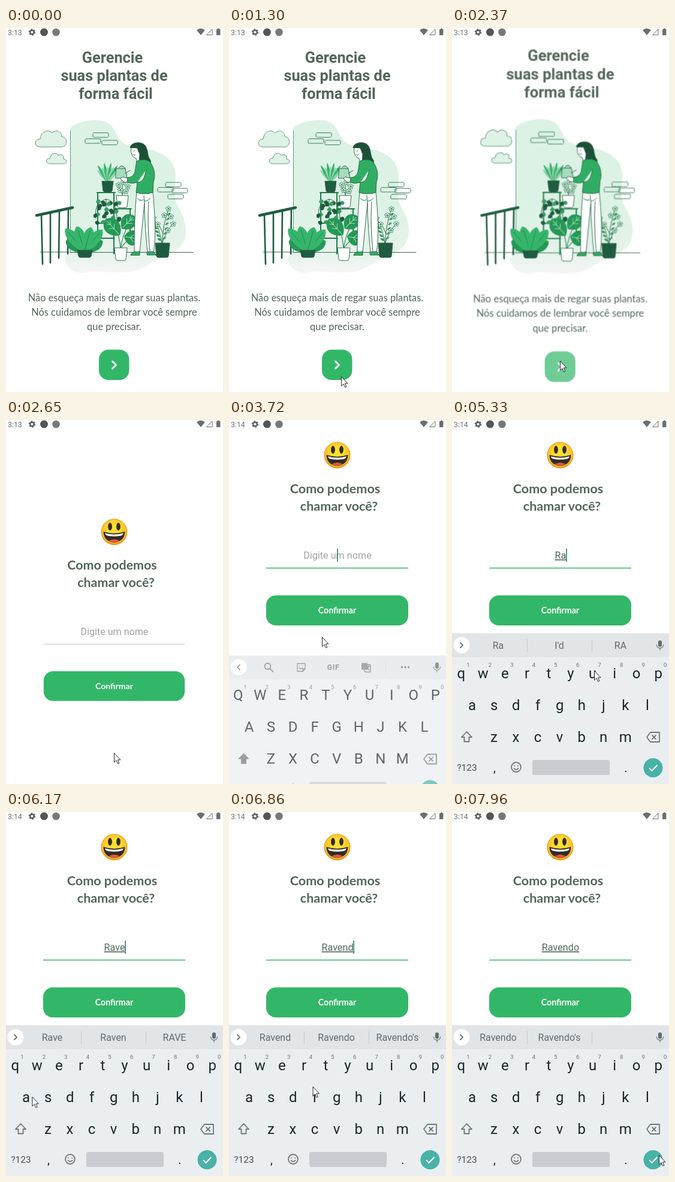
Animation of 362 by 606 pixels, one loop 8000 ms. Source, as an HTML page:

```html
<!DOCTYPE html>
<html lang="pt">
<head>
<meta charset="utf-8">
<title>Plantas</title>
<style>
html, body { margin: 0; width: 100%; height: 100%; overflow: hidden; background: #fff; }
svg { display: block; width: 362px; height: 606px; overflow: hidden; font-family: Roboto, sans-serif; }
text { white-space: pre; }
.ink { fill: #52665a; }
.mid { text-anchor: middle; }
.soft { font-family: Lato, sans-serif; }
.b { font-weight: 700; }
.key { font-size: 24px; fill: #17262b; text-anchor: middle; }
.hint { font-size: 9.5px; fill: #6b757a; text-anchor: middle; }
.word { font-size: 16px; fill: #5f6b70; text-anchor: middle; }
.typed { font-size: 16.2px; fill: #52665a; text-anchor: middle; text-decoration: underline; }
.line { fill: none; stroke: #1f5c3f; stroke-linecap: round; stroke-linejoin: round; }
.ico { fill: none; stroke: #6d777c; stroke-width: 1.8; stroke-linecap: round; stroke-linejoin: round; }
.thin { stroke-width: 1.3; }
.dots { stroke-width: 3.6; }

#welcome, #ask { transform-origin: 181px 305px; }
#welcome { animation: leave 8s linear infinite; }
#ask { animation: enter 8s linear infinite; }
#go { animation: press 8s step-end infinite; }
#form { animation: lift 8s step-end infinite; }
#field { stroke: #cfcfcf; animation: focus 8s step-end infinite; }
#board { animation: slide 8s linear infinite; }
#mouse { animation: move 8s linear infinite; }

@keyframes leave {
  0%, 29.25% { transform: scale(1); opacity: 1; }
  29.6% { transform: scale(1.012); }
  30.1% { transform: scale(1.014); opacity: 1; }
  30.5% { transform: scale(1.07); opacity: .6; }
  31.2%, 100% { transform: scale(1.12); opacity: 0; }
}
@keyframes enter {
  0%, 30.1% { transform: scale(.87); opacity: 0; }
  30.5% { transform: scale(.94); opacity: .5; }
  31.2% { transform: scale(.975); opacity: 1; }
  31.8% { transform: scale(.988); }
  33.125% { transform: scale(.993); }
  34.5%, 100% { transform: scale(1); opacity: 1; }
}
@keyframes press { 0% { opacity: 1; } 25.5%, 100% { opacity: .7; } }
@keyframes lift { 0% { transform: translateY(127px); } 45%, 100% { transform: none; } }
@keyframes focus { 0% { stroke: #cfcfcf; } 40.75%, 100% { stroke: #32b768; } }
@keyframes slide {
  0%, 45% { transform: translateY(252px); opacity: .3; animation-timing-function: cubic-bezier(.1, .5, .5, 1); }
  46.5% { transform: translateY(37px); opacity: .7; animation-timing-function: ease-out; }
  48.125%, 100% { transform: translateY(0); opacity: 1; }
}
@keyframes move {
  0%, 7% { transform: translate(173px, 607px); }
  16.25%, 17.5% { transform: translate(187px, 580px); }
  21%, 33.75% { transform: translate(180px, 554px); }
  39.9%, 51% { transform: translate(155px, 361px); }
  55.25%, 57% { transform: translate(88px, 424px); }
  62%, 63.25% { transform: translate(106px, 478px); }
  66.625% { transform: translate(237px, 417px); }
  68.5% { transform: translate(238px, 418px); }
  71.75% { transform: translate(185px, 438px); }
  75.25%, 77.125% { transform: translate(43px, 474px); }
  80.25%, 81% { transform: translate(124px, 424px); }
  83.6%, 84.5% { transform: translate(107px, 474px); }
  85.75% { transform: translate(139px, 457px); }
  89.75%, 91.9% { transform: translate(308px, 424px); }
  97.25% { transform: translate(339px, 560px); }
  99.5%, 100% { transform: translate(345px, 571px); }
}
</style>
</head>
<body>
<svg viewBox="0 0 362 606">
<defs>
  <linearGradient id="wash" x1="0" y1="0" x2="0" y2="1">
    <stop offset=".55" stop-color="#dcf2e5"/><stop offset=".86" stop-color="#e6f3eb"/><stop offset="1" stop-color="#f5f6f6"/>
  </linearGradient>
  <radialGradient id="sun" cx=".5" cy=".4" r=".6">
    <stop offset=".3" stop-color="#fde030"/><stop offset=".75" stop-color="#fbc327"/><stop offset="1" stop-color="#f0932a"/>
  </radialGradient>
</defs>

<g id="welcome">
  <g class="ink b mid" font-size="25.3">
    <text x="177.5" y="58">Gerencie</text>
    <text x="180.5" y="88">suas plantas de</text>
    <text x="183" y="118">forma fácil</text>
  </g>
  <path fill="url(#wash)" d="M107 166C120 156 140 152 158 154C176 157 180 168 186 180C194 196 212 198 232 201C262 205 283 222 283 246C283 262 279 272 283 288C289 304 300 316 300 338C300 362 284 373 262 381C238 390 228 406 196 407C172 409 150 402 128 408C108 408 97 392 98 382L107 372Z"/>
  <g class="line" id="scene">
    <path stroke="#4f9f75" d="M107.5 171V374"/>
    <path stroke-width=".9" d="M57 373H106M108 373.5H312"/>
    <g fill="#def2e6" stroke="#5c9a7b">
      <path d="M57 198C46 198 47 184 57 185C58 173 70 167 77 175C84 168 93 172 93 181C102 181 104 196 94 198Z"/>
      <path d="M73 226C65 226 66 216 73 217C75 208 84 206 87 212C93 209 97 212 96 218C103 219 102 226 96 226Z"/>
    </g>
    <path stroke-width="4.5" d="M51 312L111 299"/>
    <path stroke-width="2.6" d="M59 312L61 393M74 309L74 391M89 306L88 383M104 303L103 376"/>
    <path stroke-width="2" d="M153 274V351M180 274V376M207 301V350M152 274H182M181 301H209M153 325H181M154 350H181" stroke="#237a4b"/>
  </g>
  <g id="plants"></g>
  <g class="line" stroke-width=".9">
    <path fill="#a6dcbc" d="M184 234H199L202 250H183ZM199 242L207 237M184 237L180 234M188 233Q193 225 199 234"/>
    <path fill="#fff" d="M214 372C214 338 215 302 218 273H245C248 306 251 345 246 374H236C234 350 231 320 231 291L223 374ZM231 291L230 279M241 283Q236 289 231 288M238 289Q235 325 240 372M219 284Q224 289 229 286"/>
    <path fill="#2fae63" d="M208 378Q211 371 217 373L223 372V378ZM235 373L245 372 251 378H236Z"/>
    <path fill="#fff" d="M209 200C207 207 211 216 217 217L218 222 228 221 227 205 219 197ZM203 250L194 248 191 251 196 256 203 257Z"/>
    <path fill="#1d4f38" d="M207 199C209 189 228 188 233 197C238 206 235 213 241 220C243 227 237 231 231 230L222 226 223 210 219 200Z"/>
    <path fill="#2fae63" d="M218 222C226 217 237 219 241 224C247 232 250 246 246 256L245 274Q231 278 217 274L219 257Q210 260 202 257L203 249Q212 249 215 240ZM219 257Q228 257 231 247L234 236"/>
    <path stroke-width=".8" d="M213 205l2-.5M212 211q2 2 4 0"/>
  </g>
  <g class="ink soft mid" font-size="16.4">
    <text x="180.5" y="455">Não esqueça mais de regar suas plantas.</text>
    <text x="180.5" y="479">Nós cuidamos de lembrar você sempre</text>
    <text x="180.5" y="503">que precisar.</text>
  </g>
  <g id="go">
    <rect x="155" y="535.5" width="50.5" height="50.5" rx="16" fill="#32b768"/>
    <path d="M177.5 555l6 6-6 6" fill="none" stroke="#fff" stroke-width="3" stroke-linecap="round" stroke-linejoin="round"/>
  </g>
</g>

<g id="ask"><g id="form">
  <circle cx="180.5" cy="58.5" r="21.5" fill="url(#sun)" stroke="#eb8f00"/>
  <ellipse cx="173.5" cy="49.5" rx="3.4" ry="6.4" fill="#322b26"/>
  <ellipse cx="187.5" cy="49.5" rx="3.4" ry="6.4" fill="#322b26"/>
  <path d="M162.500 58Q180.500 64 198.500 58C198.500 69 191 76 180.500 76S162.500 69 162.500 58Z" fill="#322b26"/>
  <path d="M165 60.500Q180.500 65 196 60.500C195.500 63 194 64.500 191 65Q180.500 67 170 65C167 64.500 165.500 63 165 60.500Z" fill="#fff"/>
  <path d="M171.500 73.500Q180.500 68.500 189.500 73.500Q180.500 77.500 171.500 73.500Z" fill="#ea5a3d"/>
  <g class="ink soft b mid" font-size="21.6">
    <text x="177" y="122">Como podemos</text>
    <text x="183.5" y="151">chamar você?</text>
  </g>
  <text id="hint" class="mid" x="181" y="231" font-size="16.2" fill="#a4a4a4">Digite um nome</text>
  <g id="entry"></g>
  <path id="field" d="M62 246.5H299" stroke-width="1.3"/>
  <rect x="62" y="292" width="237" height="50" rx="16" fill="#32b768"/>
  <text class="soft b mid" x="180.5" y="322" font-size="14.2" fill="#fff">Confirmar</text>
</g></g>

<g id="board">
  <rect y="355" width="362" height="260" fill="#eaeef1"/>
  <rect y="355" width="362" height="40" fill="#e1e5e8"/>
  <circle cx="16" cy="375" r="13.5" fill="#fff"/>
  <g id="tools">
    <path class="ico" d="M18 371l-4 4 4 4"/>
    <path class="ico" d="M68.500 377.500l5 5"/><circle class="ico" cx="64.5" cy="373.5" r="5"/>
    <path class="ico thin" d="M114 369H127V378L123 382H114ZM127 378H123V382M118 373v.1M123 373v.1M117 376q3 3 6 0"/>
    <text class="b mid" x="174" y="379.5" font-size="12" letter-spacing=".8" fill="#6d777c">GIF</text>
    <rect x="221" y="368" width="10" height="11" rx="1" fill="#7c868b"/>
    <path class="ico thin" d="M231 371H236V383H227L225 379M230 374H235M232.500 373Q232 378 229 379M231 376L234 380"/>
    <path d="M261.5 365V386" stroke="#d1d5d8"/>
    <path class="ico dots" d="M288.500 375v.01M294 375v.01M299.500 375v.01"/>
  </g>
  <g id="words">
    <path class="ico" d="M14 371l4 4-4 4"/>
    <path d="M125.5 365V386M233.5 365V386" stroke="#c5c9cc"/>
  </g>
  <rect x="344" y="367" width="6" height="10.5" rx="3" fill="#616b70"/>
  <path class="ico thin" d="M341.500 374.500c0 7 11 7 11 0M347 380V383"/>
  <g id="keys">
    <path id="caps" d="M24.500 518L34 528H29V536H20V528H15Z" fill="#6d777c"/>
    <path id="shift" class="ico" d="M24.500 519L33 528H28.500V535.500H20.500V528H16Z"/>
    <path class="ico" d="M331 520H346V536H331L325 528ZM334 525l6 6M340 525l-6 6"/>
    <text class="mid" x="25" y="584" font-size="15.5" fill="#465157">?123</text>
    <text class="mid" x="71" y="586" font-size="20" fill="#17262b">,</text>
    <text class="mid" x="290" y="586" font-size="20" fill="#17262b">.</text>
    <circle class="ico" cx="107" cy="578" r="8"/>
    <path class="ico" d="M104 576v.1M110 576v.1M103.500 580q3.500 4 7 0"/>
    <rect x="134" y="566" width="129" height="25" rx="3" fill="#c8ccd0"/>
    <circle cx="335.5" cy="579" r="16" fill="#48b2a8"/>
    <path d="M329 579.500l4.500 4.500 9-9.500" fill="none" stroke="#fff" stroke-width="2"/>
    <g id="upper"></g><g id="lower"></g>
  </g>
</g>

<g fill="#6e6e6e">
  <text id="before" x="3" y="11.5" font-size="12.3">3:13</text>
  <text id="after" x="3" y="11.5" font-size="12.3">3:14</text>
  <circle cx="43.5" cy="7" r="3.3" fill="none" stroke="#5f5f5f" stroke-width="2.4"/>
  <circle cx="43.5" cy="7" r="5" fill="none" stroke="#5f5f5f" stroke-width="1.6" stroke-dasharray="2.5 2.736"/>
  <circle cx="63.5" cy="7" r="6.5" fill="#555"/>
  <circle cx="83.5" cy="7" r="6.3" fill="#777"/>
  <path d="M325 12L318 3.500Q325-2 332 3.500Z"/>
  <path d="M334.500 11.500H344V2Z" fill="none" stroke="#6e6e6e"/>
  <path d="M351 2H353V.8H356V2H357.500V12H351Z"/>
</g>

<path id="mouse" d="M.5.5V16L4 12.700 6.500 18.300 8.800 17.300 6.400 11.800H11Z" fill="#fff" stroke="#111" stroke-width=".9"/>
</svg>

<script>
const LOOP = 8000;
const $ = id => document.getElementById(id);
const add = (id, markup) => {
  $(id).insertAdjacentHTML('beforeend', markup);
  return $(id).lastElementChild;
};

// Shows an element only inside the given [from, to] spans, in ms.
function show(el, ...spans) {
  const easing = 'steps(1, end)';
  const steps = [];
  const mark = (ms, visibility) => steps.push({ offset: ms / LOOP, visibility, easing });
  if (spans[0][0] > 0) mark(0, 'hidden');
  for (const [from, to] of spans) {
    mark(from, 'visible');
    if (to < LOOP) mark(to, 'hidden');
  }
  mark(LOOP, steps.at(-1).visibility);
  el.animate(steps, { duration: LOOP, iterations: Infinity });
}

// Scenery
const brick = (x, y) => add('scene',
  `<rect x="${x}" y="${y}" width="26" height="7.5" rx="1.5" stroke="#3d7f5e" stroke-dasharray="30 1.5"/>`);
[[145, 174.5], [132, 184.5], [160, 187], [266, 257], [253, 265.5], [277, 267], [270, 277]].forEach(p => brick(...p));

const leaf = (x, y, turn, len, wide, fill, edge = 0) => add('plants',
  `<path d="M0 0C-.5-.2-.75-.8 0-1C.75-.8.5-.2 0 0" fill="${fill}" stroke="#2b7a50" stroke-width="${edge}" transform="translate(${x} ${y})rotate(${turn})scale(${wide} ${len})"/>`);
const stroke = (d, color = '#1f5c3f', width = .9) => add('plants',
  `<path class="line" d="${d}" style="stroke:${color};stroke-width:${width}"/>`);
const pot = (x, y, w, h, fill) => add('plants',
  `<path d="M${x} ${y}h${w}l-2 ${h - 2}q-.5 2-3 2h${10 - w}q-2.5 0-3-2z" fill="${fill}" stroke="#1f5c3f" stroke-width=".9"/>`);
const flower = (x, y) => {
  for (let a = 0; a < 360; a += 72) leaf(x, y, a, 4.6, 3.4, '#f3faf6', .2);
  add('plants', `<circle cx="${x}" cy="${y}" r="1.2" fill="#2fae63"/>`);
};

for (let i = -4; i <= 4; i++) leaf(169.5, 257, i * 10, i % 2 ? 33 : 27, 4.5, i % 2 ? '#37b36c' : '#8fd3ac');
pot(160, 255, 19, 18, '#1f5c3f');

stroke('M194 280V262M194 276L187 264M194 276L203 266');
[[188, 261], [196, 257], [203, 264], [191, 270], [200, 272]].forEach(p => flower(...p));
pot(184, 279, 20, 20, '#fff');

stroke('M167 285Q146 290 150 317M167 285Q186 287 185 322M167 285V324');
for (let i = 0; i < 24; i++) {
  const x = 150 + i % 4 * 11 + Math.sin(i * 5) * 3, y = 290 + (i >> 2) * 6.5;
  leaf(x, y, 70 + Math.sin(i * 7) * 45, 8, 7, i % 3 ? '#1f5c3f' : '#37a065');
}

stroke('M191 368Q190 345 181 331M191 368Q194 345 206 324M191 368Q197 357 209 350', '#2b8a57', 1.2);
[[190, 345, -42, 36, 28], [193, 334, 45, 30, 26], [197, 347, 100, 26, 27]].forEach(([x, y, a, l, w]) => {
  leaf(x, y, a, l, w, '#249955');
  add('plants', `<path class="line" style="stroke:#a6dcbc" transform="translate(${x} ${y})rotate(${a})" d="M0-3V${4 - l}M0${-l * .4}l-6-6M0${-l * .4}l6-6M0${-l * .65}l-4-5M0${-l * .65}l4-5"/>`);
});
pot(181, 366, 21, 21, '#fff');

[[-60, 36], [60, 35], [-40, 50], [39, 47], [-17, 44], [15, 42]].forEach(([a, l], i) => {
  leaf(131, 372, a, l, 19, i < 2 ? '#249955' : '#36b56c');
  const r = a * Math.PI / 180;
  stroke(`M131 372L${131 + Math.sin(r) * l * .85} ${372 - Math.cos(r) * l * .85}`, '#1f7a49', .8);
});
pot(119, 370, 25, 12, '#1f5c3f');

stroke('M260 360Q262 325 271 302M260 360Q257 335 246 316M260 360Q266 340 279 325M262 342L254 326');
for (let i = 0; i < 6; i++) {
  leaf(261 + i * 1.5, 352 - i * 8, 55, 7, 3.5, '#37a065');
  leaf(259 - i * 2, 354 - i * 6.5, -60, 7, 3.5, '#249955');
}
[[271, 301], [264, 312], [275, 314], [246, 317], [253, 327], [279, 326], [244, 334], [270, 337]].forEach(p => flower(...p));
pot(249, 358, 24, 24, '#1f5c3f');

// Keyboard
[['qwertyuiop', 15.3, 429.5], ['asdfghjkl', 33.6, 482.5], ['zxcvbnm', 70, 535.5]].forEach(([row, x0, y], n) =>
  [...row].forEach((c, i) => {
    const x = x0 + i * 36.55;
    add('lower', `<text class="key" x="${x}" y="${y}">${c}</text>`);
    add('upper', `<text class="key" x="${x}" y="${y}">${c.toUpperCase()}</text>`);
    if (!n) add('keys', `<text class="hint" x="${x + 11.5}" y="411">${(i + 1) % 10}</text>`);
  }));

// Typing
const FOCUS = 3260;
const stages = [
  [FOCUS, ''],
  [4480, 'R', 'R', 'Re', 'Rs'],
  [5030, 'Ra', 'Ra', "I'd", 'RA'],
  [5480, 'Rav', 'Rav', 'Rave', 'RAV'],
  [6170, 'Rave', 'Rave', 'Raven', 'RAVE'],
  [6450, 'Raven', 'Raven', 'Ravendo', 'Ravens'],
  [6740, 'Ravend', 'Ravend', 'Ravendo', "Ravendo's"],
  [7330, 'Ravendo', 'Ravendo', "Ravendo's", '']
];
const FIRST = stages[1][0];

stages.forEach(([from, typed, ...words], n) => {
  const to = n + 1 < stages.length ? stages[n + 1][0] : LOOP;
  const text = add('entry', `<text class="typed" x="181" y="231">${typed}</text>`);
  show(text, [from, to]);
  const x = 181 + (typed ? text.getComputedTextLength() / 2 + .6 : 0);
  const blinks = [];
  for (let t = from; t < to; t += 1000) blinks.push([t, Math.min(t + 500, to)]);
  show(add('entry', `<path d="M${x} 214V236" stroke="#2a7d6d" stroke-width="1.6"/>`), ...blinks);
  words.forEach((w, i) =>
    show(add('board', `<text class="word" x="${77 + i * 102}" y="381">${w}</text>`), [from, to]));
});

['hint', 'tools', 'caps', 'upper'].forEach(id => show($(id), [0, FIRST]));
['words', 'shift', 'lower'].forEach(id => show($(id), [FIRST, LOOP]));
show($('before'), [0, 3300]);
show($('after'), [3300, LOOP]);
</script>
</body>
</html>
```
